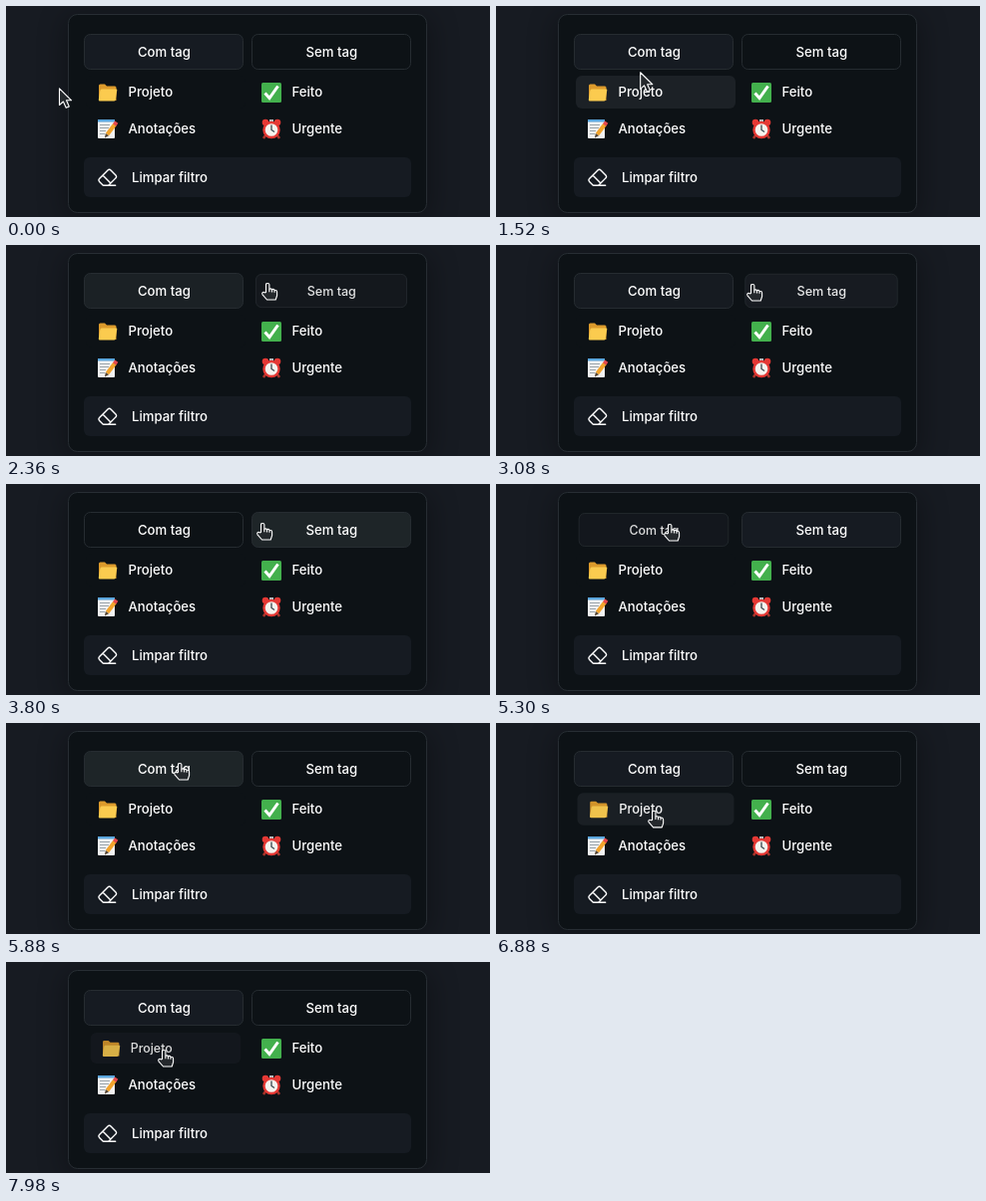
Animation of 485 by 212 pixels, one loop 8 s. Source, as an HTML page:

```html
<!DOCTYPE html>
<html lang="pt">
<head>
<meta charset="utf-8">
<title>Filtro por tag</title>
<style>
html, body { margin: 0; width: 100%; height: 100%; overflow: hidden; background: #171b22; }
svg { display: block; width: 485px; height: 212px; }
text { font: 500 13.2px Inter, sans-serif; fill: #fff; }
.mid { text-anchor: middle; }
.shadow { fill: #000; opacity: .28; filter: blur(14px); }
.button { stroke: #262c31; }
.line { fill: none; stroke: #fff; stroke-width: 1.6; stroke-linecap: round; stroke-linejoin: round; }
.cursor { fill: #25292d; stroke: #fff; stroke-width: 1.1; stroke-linejoin: round; }
</style>
</head>
<body>
<svg viewBox="0 0 485 212">
  <rect class="shadow" x="58" y="10" width="369" height="206" rx="10"/>
  <rect x="62.5" y="8.5" width="359" height="199" rx="9" fill="#0d1216" stroke="#272d33"/>

  <g id="com">
    <rect class="button" x="78.5" y="28.5" width="159" height="35" rx="6"/>
    <text class="mid" x="158.5" y="51">Com tag</text>
  </g>
  <g id="sem">
    <rect class="button" x="246.5" y="28.5" width="159" height="35" rx="6"/>
    <text class="mid" x="326.3" y="51">Sem tag</text>
  </g>

  <g id="project">
    <rect x="80" y="70" width="160" height="33" rx="6"/>
    <path d="M93 80q0-1.500 1.500-1.500h4.500l2 2h8q1.500 0 1.500 1.500v13h-17.500z" fill="#dd9b2c"/>
    <path d="M96 83.500h14.500q1 0 .8 1l-1.500 9.500q-.2 1.500-1.700 1.500h-14q-1.500 0-1.300-1.500l1.500-9q.2-1.500 1.700-1.500z" fill="#fbcb4f"/>
    <text x="122.500" y="91">Projeto</text>
  </g>

  <g>
    <rect x="92" y="114" width="17" height="19" rx="1" fill="#f1f1f1"/>
    <path d="M92 114h17v2.500H92z" fill="#5aa5dc"/>
    <path d="M94 119.500h10m-10 3h9m-9 3h6m-6 3h5" stroke="#9ba4aa"/>
    <path d="M101.500 129l7.500-10" stroke="#f2a32b" stroke-width="4"/>
    <path d="M108.700 119.500l2-2.800" stroke="#e5484d" stroke-width="4"/>
    <path d="M99.800 128l3.200 2.300-4 2.200z" fill="#54422f"/>
    <text x="122.500" y="128">Anotações</text>
  </g>

  <g>
    <rect x="256" y="77" width="20" height="20" rx="1.500" fill="#43b04d"/>
    <path d="M259.500 87.500l4.500 5 8.500-12" fill="none" stroke="#fff" stroke-width="3"/>
    <text x="286.500" y="91">Feito</text>
  </g>

  <g>
    <path d="M260 130l-2 3m14-3l2 3" stroke="#a9342b" stroke-width="2.500"/>
    <circle cx="260" cy="117" r="3.300" fill="#e53935"/>
    <circle cx="272" cy="117" r="3.300" fill="#e53935"/>
    <path d="M264 114h4v3h-4z" fill="#b5bcc0"/>
    <circle cx="266" cy="124.500" r="7.500" fill="#f5f3ee" stroke="#e53935" stroke-width="2.400"/>
    <path d="M266 119.500v5l3 2" fill="none" stroke="#37474f" stroke-width="1.300"/>
    <text x="286.500" y="128">Urgente</text>
  </g>

  <rect x="78" y="152" width="328" height="40" rx="6" fill="#161b22"/>
  <g class="line" transform="translate(91.200 161.700) scale(.88)">
    <path d="M7 21l-4.300-4.300c-1-1-1-2.500 0-3.400l9.600-9.600c1-1 2.500-1 3.400 0l5.600 5.600c1 1 1 2.500 0 3.400L13 21M21 21H7M6.500 9.500l9 9"/>
  </g>
  <text x="126" y="177">Limpar filtro</text>

  <path class="cursor" id="arrow" d="M.5.800v16.700l3.900-3.500 2.800 6.300 3.100-1.400-2.800-6.100h5.100z"/>
  <g class="cursor" id="hand">
    <path d="M-2.500 9.500V1.700Q-2.500.5-.8.5t1.700 1.200v4.500q1.500-.8 2.600.4 1.600-.6 2.500.6 2.600-.2 2.600 2.300v3.200l-1.400 4.300h-8.700L-6 11.800q-.8-1.500.4-2.300 1-.5 2 .4z"/>
    <path d="M.9 6.200v3M3.500 6.600v2.800M6 7.200v2.500" fill="none"/>
  </g>
</svg>

<script>
const LOOP = 8000, PRESS = 180, FADE = 300;
const $ = id => document.getElementById(id);

// Pointer path: time, x, y
const path = [
  [0, 53, 82], [980, 53, 82], [1520, 144, 66], [1700, 176, 40], [1800, 176, 40],
  [2220, 236, 37], [2360, 263, 38], [2540, 258, 39], [3880, 258, 39],
  [4180, 175, 40], [6280, 175, 40], [6900, 159, 88], [LOOP, 159, 88]
];

// Presses are pairs of down and up times; picked is how strongly an item is selected
const items = [
  { id: "com", box: [78, 28, 160, 36], presses: [[4190, 4410], [5170, 5420]],
    picked: t => 1 - chosenSem(t) },
  { id: "sem", box: [246, 28, 160, 36], presses: [[2280, 2650], [2790, 3060]],
    picked: chosenSem },
  { id: "project", box: [80, 70, 160, 33], presses: [[6860, 7110], [7810, 8200]],
    picked: () => 0 }
];
const IDLE = [13, 18, 22], PICKED = [22, 27, 34], ACTIVE = [21, 25, 31];
const HOVER = [34, 39, 44], PICKED_HOVER = [30, 37, 40];

const clamp = u => Math.max(0, Math.min(1, u));
const easeOut = u => 1 - (1 - clamp(u)) ** 3;
const mix = (a, b, u) => a.map((v, i) => v + (b[i] - v) * u);

function chosenSem(t) {
  return clamp((t - 3060) / 400) - clamp((t - 5420) / 400);
}

// Slope through a key; zero where the pointer rests or turns
function slope(i, axis) {
  const a = path[i - 1], b = path[i], c = path[i + 1];
  if (!a || !c || (b[axis] - a[axis]) * (c[axis] - b[axis]) <= 0) return 0;
  return (c[axis] - a[axis]) / (c[0] - a[0]);
}

function pointer(t) {
  const i = Math.max(1, path.findIndex(k => k[0] > t));
  const a = path[i - 1], b = path[i], d = b[0] - a[0];
  const u = clamp((t - a[0]) / d);
  return [1, 2].map(n =>
    a[n] + (b[n] - a[n]) * u * u * (3 - 2 * u)
    + d * u * (1 - u) * (slope(i - 1, n) * (1 - u) - slope(i, n) * u));
}

const inside = ([x, y], [left, top, w, h]) =>
  x >= left && x <= left + w && y >= top && y <= top + h;

// Share of the last FADE ms that the pointer spent on the box
function hover(t, box) {
  let hits = 0;
  for (let k = 0; k < 30; k++) hits += inside(pointer(t - k * FADE / 30), box);
  return hits / 30;
}

const pressed = (t, list) => list.reduce((sum, [down, up]) =>
  sum + easeOut((t - down) / PRESS) - easeOut((t - up) / PRESS), 0);

function draw(t) {
  const pos = pointer(t);
  for (const { id, box, presses, picked } of items) {
    const [x, y, w, h] = box, p = pressed(t, presses), group = $(id);
    const cx = x + w / 2, cy = y + h / 2;
    group.setAttribute("transform",
      `translate(${cx} ${cy}) scale(${1 - .06 * p}) translate(${-cx} ${-cy})`);
    group.setAttribute("opacity", 1 - .15 * p);
    const rest = mix(IDLE, PICKED, picked(t)), lit = mix(HOVER, PICKED_HOVER, picked(t));
    const color = mix(mix(rest, lit, hover(t, box)), ACTIVE, p);
    group.querySelector("rect").setAttribute("fill", `rgb(${color.map(Math.round)})`);
  }
  const over = items.some(item => inside(pos, item.box));
  for (const [id, shown] of [["arrow", !over], ["hand", over]]) {
    $(id).setAttribute("transform", `translate(${pos})`);
    $(id).setAttribute("visibility", shown ? "visible" : "hidden");
  }
}

const start = performance.now();
function frame() {
  draw((performance.now() - start) % LOOP);
  requestAnimationFrame(frame);
}
frame();
</script>
</body>
</html>
```
